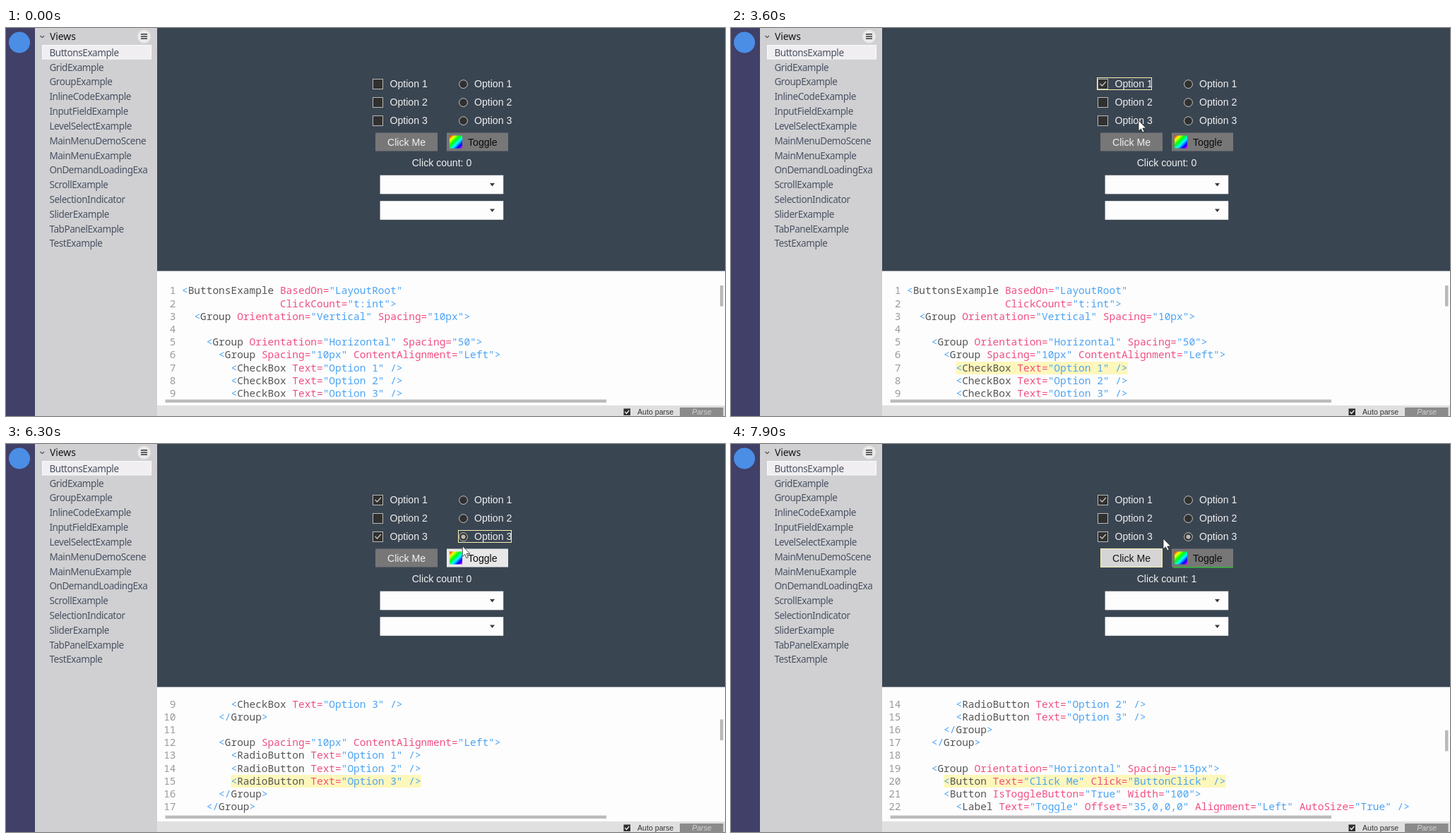
An HTML page that plays this animation: 1018x550 px, repeating every 8 s.

```html
<!DOCTYPE html>
<html lang="en">
<head>
<meta charset="utf-8">
<title>View editor</title>
<style>
  html, body { margin: 0; width: 100%; height: 100%; overflow: hidden; background: #3a4552; }
  svg { display: block; }
  text { white-space: pre; }
  .ui { font: 14.1px "Liberation Sans", Arial, sans-serif; fill: #f0f0f0; }
  .side { font: 13.5px "Noto Sans", sans-serif; letter-spacing: -.42px; fill: #4a5263; }
  .title { font: 13.8px "Noto Sans", sans-serif; fill: #151515; }
  .code { font: 14.48px "Noto Sans Mono", monospace; fill: #555; }
  .num { fill: #9a9a9a; text-anchor: end; }
  .attr { fill: #f04f82; }
  .str { fill: #4ba3f4; }
  .small { font: 10.6px "Liberation Sans", Arial, sans-serif; fill: #333; }
  .mid { text-anchor: middle; }
</style>
</head>
<body>
<svg id="stage" width="1018" height="550" viewBox="0 0 1018 550">
  <defs>
    <clipPath id="codeClip"><rect x="214" y="360" width="804" height="162.7"/></clipPath>
    <linearGradient id="rainbow" x2="1" y2="1"></linearGradient>
  </defs>
</svg>
<script>
const LOOP = 8000, STEP = 100;
const CHAR = 8.688, LINE = 18.2, CODE_X = 249, CODE_Y = 377.4;
const stage = document.getElementById('stage');

function add(tag, attrs, parent = stage) {
  const el = document.createElementNS('http://www.w3.org/2000/svg', tag);
  set(el, attrs);
  parent.appendChild(el);
  return el;
}
function set(el, attrs) {
  for (const key in attrs) el.setAttribute(key, attrs[key]);
}
const rect = (x, y, width, height, fill, more = {}, parent = stage) =>
  add('rect', { x, y, width, height, fill, ...more }, parent);
const circle = (cx, cy, r, fill, more = {}) => add('circle', { cx, cy, r, fill, ...more });
const path = (d, stroke, width) => add('path', { d, stroke, 'stroke-width': width, fill: 'none' });
const show = (el, on) => el.setAttribute('visibility', on ? 'visible' : 'hidden');
const ramp = (t, from, to) => Math.min(1, Math.max(0, (t - from) / (to - from)));
function label(x, y, str, cls, parent = stage) {
  const el = add('text', { x, y, class: cls }, parent);
  el.textContent = str;
  return el;
}

// Panels
rect(0, 0, 41, 550, '#404068');
rect(41, 0, 173, 550, '#d0d0d2');
rect(214, 344.5, 804, 206, '#fdfdfd');
rect(214, 535, 804, 15, '#e0e0e0');
circle(19, 20.5, 15, '#4b8ee6');

// Sidebar
path('M48.5 11l2.7 2.6l2.7 -2.6', '#444', 1.1);
label(62, 17, 'Views', 'title');
circle(195.5, 12, 9.4, '#e9e9ea');
path('M191 8.7h9M191 11.9h9M191 15.1h9', '#333', 1.5);
rect(51.5, 24.5, 154, 19.5, '#f1eef1', { stroke: '#fbfbfb' });
const views = `ButtonsExample GridExample GroupExample InlineCodeExample InputFieldExample
  LevelSelectExample MainMenuDemoScene MainMenuExample OnDemandLoadingExa ScrollExample
  SelectionIndicator SliderExample TabPanelExample TestExample`.split(/\s+/);
views.forEach((name, i) => label(61.4, 39.7 + i * 20.83, name, 'side'));

// Preview controls
const checks = [], radios = [];
for (let i = 0; i < 3; i++) {
  const y = 79 + i * 26, name = 'Option ' + (i + 1);
  rect(519.5, y - 6.5, 14, 14, '#303030', { stroke: '#b9b9b5' });
  checks.push(path(`M522.5 ${y}l3 3l5.3 -6`, '#c4c4c0', 1.3));
  label(543.5, y + 5, name, 'ui');
  circle(647.5, y + .6, 5.9, '#303030', { stroke: '#c8c8c4' });
  radios.push(circle(647.5, y + .6, 3.1, '#b8b8b4'));
  label(663, y + 5, name, 'ui');
}
const clickBtn = rect(523, 148.5, 88, 26, '');
const clickText = label(567, 166.5, 'Click Me', 'ui mid');
const toggleBtn = rect(624, 148.5, 87, 26, '');
for (let i = 0; i < 6; i++)
  add('stop', { offset: i / 5, 'stop-color': `hsl(${i * 60} 100% 50%)` }, document.getElementById('rainbow'));
rect(628, 152.5, 18, 18, 'url(#rainbow)');
label(654, 166.5, 'Toggle', 'ui').style.fill = '#0b0b0b';
const edge = path('M626 174.8h85', '#35d535', 1.3);
const count = label(617, 196, '', 'ui mid');
for (const y of [208.7, 245.2]) {
  rect(529.6, y, 174.6, 26.6, '#fdfdfd');
  add('path', { d: `M685 ${y + 11.2}h7l-3.5 4.5z`, fill: '#3d3d3d' });
}
const outline = rect(0, 0, 0, 0, 'none', { stroke: '#f6f0b4' });

// Code editor
const source = `<ButtonsExample BasedOn="LayoutRoot"
                ClickCount="t:int">
  <Group Orientation="Vertical" Spacing="10px">

    <Group Orientation="Horizontal" Spacing="50">
      <Group Spacing="10px" ContentAlignment="Left">
        <CheckBox Text="Option 1" />
        <CheckBox Text="Option 2" />
        <CheckBox Text="Option 3" />
      </Group>

      <Group Spacing="10px" ContentAlignment="Left">
        <RadioButton Text="Option 1" />
        <RadioButton Text="Option 2" />
        <RadioButton Text="Option 3" />
      </Group>
    </Group>

    <Group Orientation="Horizontal" Spacing="15px">
      <Button Text="Click Me" Click="ButtonClick" />
      <Button IsToggleButton="True" Width="100">
        <Label Text="Toggle" Offset="35,0,0,0" Alignment="Left" AutoSize="True" />`.split('\n');
const clip = add('g', { 'clip-path': 'url(#codeClip)' });
const code = add('g', {}, clip);
const mark = rect(0, 0, 0, 18, '#fdf7bb', {}, code);
source.forEach((line, i) => {
  const y = CODE_Y + i * LINE;
  label(240.5, y, i + 1, 'code num', code);
  const row = add('text', { x: CODE_X, y, class: 'code' }, code);
  for (const [token] of line.matchAll(/\w+=|"[^"]*"|<\/?|\/?>|\w+|\s+/g)) {
    const cls = token.endsWith('=') ? 'attr' : /^["<>\/]/.test(token) ? 'str' : '';
    add('tspan', { class: cls }, row).textContent = token;
  }
});
const thumb = rect(1011, 365, 4.5, 29.5, '#b9b9b9');
rect(225.5, 526.6, 624.5, 4.4, '#bcbcbc');

// Status bar
rect(874.5, 539.5, 9.5, 9.5, '#2c2c2c');
path('M876.5 544l2 2.4l3.8 -4.4', '#f2f2f2', 1.3);
label(894, 547.8, 'Auto parse', 'small');
rect(954, 538, 61.5, 12, '#8b8b8b');
label(985, 547.8, 'Parse', 'small mid').style.cssText = 'fill:#d2d2d2;font-style:italic';

const cursor = add('path', {
  d: 'M0 0V15L3.5 11.9L5.8 17.1L8.2 16.1L5.9 11H10.6Z',
  fill: '#fff', stroke: '#222', 'stroke-width': .8
});

// Pointer moves: each runs from start to end towards x, y
const moves = [
  { start: 100, end: 300, x: 820, y: 121 },
  { start: 400, end: 1100, x: 575, y: 86 },
  { start: 1200, end: 1400, x: 574.5, y: 82 },
  { start: 2400, end: 2600, x: 577, y: 85 },
  { start: 2700, end: 3100, x: 580, y: 106 },
  { start: 3200, end: 3600, x: 577, y: 131 },
  { start: 4600, end: 5300, x: 687.5, y: 131 },
  { start: 6000, end: 6600, x: 605, y: 158 },
  { start: 6600, end: 6900, x: 580, y: 157 },
  { start: 7800, end: 7900, x: 612, y: 134 }
];
// Clicks select an element and its code line
const option = (x, row, width) => ({ x, y: 70.5 + row * 26, width, height: 17 });
const CHECK_1 = 1800, CHECK_3 = 3700, RADIO_3 = 5200, BUTTON = 6800;
const clicks = [
  { time: CHECK_1, line: 7, box: option(518.5, 0, 77) },
  { time: CHECK_3, line: 9, box: option(518.5, 2, 77) },
  { time: RADIO_3, line: 15, box: option(640.5, 2, 75) },
  { time: BUTTON, line: 20, box: { x: 523.5, y: 148.5, width: 87, height: 26 } }
];

function pointerAt(t) {
  let x = 945, y = 62;
  for (const m of moves) {
    const k = ramp(t, m.start, m.end);
    x += (m.x - x) * k;
    y += (m.y - y) * k;
  }
  return [x, y];
}

function paintButton(el, glow) {
  const v = Math.round(119 + 113 * glow);
  el.setAttribute('fill', `rgb(${v},${v},${v})`);
}

function select({ line, box }) {
  const text = source[line - 1], indent = text.search(/\S/);
  // Lines out of view are brought to a fixed height in the editor
  const scroll = line > 8 ? (line - 6.786) * LINE : 0;
  const top = CODE_Y + (line - 1) * LINE - 13.4 - scroll;
  set(outline, box);
  set(mark, {
    x: CODE_X + indent * CHAR,
    y: Math.round(top) + scroll,
    width: (text.length - indent) * CHAR
  });
  return scroll;
}

function draw(now) {
  const t = Math.floor((now % LOOP) / STEP) * STEP;
  show(cursor, t >= 100);
  cursor.setAttribute('transform', `translate(${pointerAt(t)})`);

  checks.forEach((tick, i) => show(tick, i === 0 && t >= CHECK_1 || i === 2 && t >= CHECK_3));
  radios.forEach((dot, i) => show(dot, i === 2 && t >= RADIO_3));

  const clickGlow = ramp(t, 6300, 6600) * (1 - .17 * ramp(t, 7800, 7900));
  paintButton(clickBtn, clickGlow);
  clickText.style.fill = clickGlow > .5 ? '#151515' : '#f0f0f0';
  paintButton(toggleBtn, ramp(t, 6000, 6300) * (1 - ramp(t, 6300, 6800)));
  show(edge, t >= BUTTON);
  count.textContent = 'Click count: ' + (t >= BUTTON ? 1 : 0);

  const click = clicks.filter(c => c.time <= t).pop();
  const scroll = click ? select(click) : 0;
  show(outline, click);
  show(mark, click);
  code.setAttribute('transform', `translate(0 ${-scroll})`);
  thumb.setAttribute('y', 365 + scroll * .17);
}

const start = performance.now();
function frame() {
  draw(performance.now() - start);
  requestAnimationFrame(frame);
}
frame();
</script>
</body>
</html>
```
